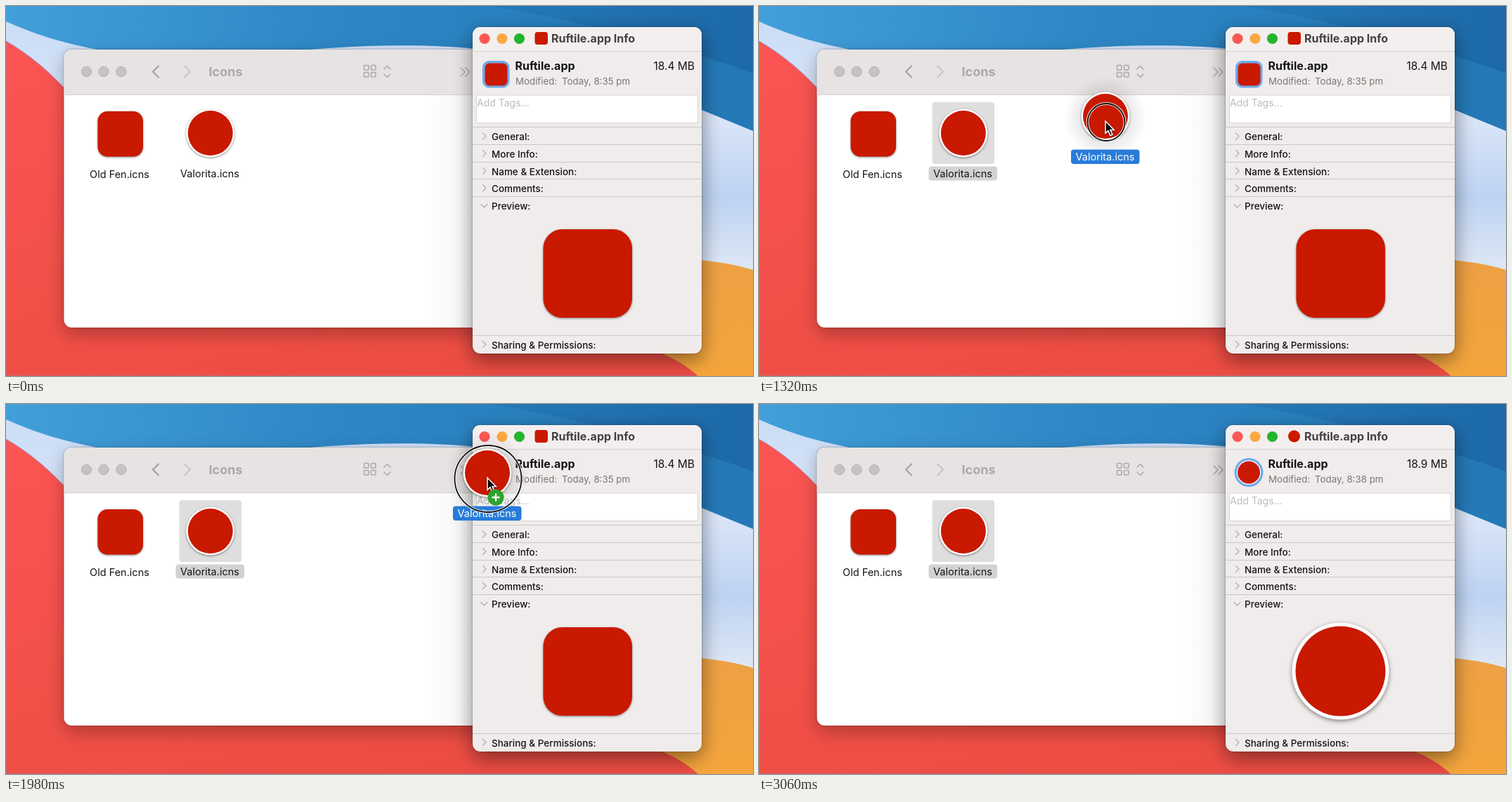
An HTML page for the animation above (4.06 s loop, 1063x527 px).

```html
<!DOCTYPE html>
<html lang="en">
<head>
<meta charset="utf-8">
<title>Changing an app icon</title>
<style>
  html, body { margin: 0; width: 100%; height: 100%; overflow: hidden; }
  svg { display: block; width: 1063px; height: 527px; }
  text { font: 14.5px Inter, Roboto, sans-serif; fill: #151414; }
  .mid { text-anchor: middle; }
  .bold { font-size: 16px; font-weight: 700; }
  .row { font-size: 13.5px; font-weight: 500; }
  .line { fill: none; stroke-width: 2; stroke-linecap: round; stroke-linejoin: round; }
  .window { filter: drop-shadow(0 9px 13px #0003) drop-shadow(0 0 1px #0006); }
  .front { filter: drop-shadow(0 9px 14px #0005) drop-shadow(0 0 1px #0006); }
  .icon { filter: drop-shadow(0 1px 1.5px #0007); }
  .red { fill: #c91900; }
</style>
</head>
<body>
<svg viewBox="0 0 1063 527">
  <defs>
    <linearGradient id="sky">
      <stop offset="0" stop-color="#429fd9"/>
      <stop offset=".45" stop-color="#2e86c4"/>
      <stop offset="1" stop-color="#2478b6"/>
    </linearGradient>
    <linearGradient id="deep">
      <stop offset="0" stop-color="#2579b7"/>
      <stop offset="1" stop-color="#1d69a8"/>
    </linearGradient>
    <linearGradient id="coral" x2=".5" y2="1">
      <stop offset="0" stop-color="#fb5553"/>
      <stop offset="1" stop-color="#ec4d43"/>
    </linearGradient>
    <linearGradient id="mist" x2="0" y2="1">
      <stop offset="0" stop-color="#cbddf6"/>
      <stop offset=".4" stop-color="#d9e5f8"/>
      <stop offset=".7" stop-color="#bdd2f2"/>
      <stop offset="1" stop-color="#dfe9f5"/>
    </linearGradient>
    <linearGradient id="amber" x2="0" y2="1">
      <stop offset="0" stop-color="#eda045"/>
      <stop offset="1" stop-color="#f4a53c"/>
    </linearGradient>
    <linearGradient id="edge">
      <stop offset="0" stop-color="#fff"/>
      <stop offset="1" stop-color="#f3f3f3"/>
    </linearGradient>
    <radialGradient id="halo">
      <stop offset=".5" stop-color="#000" stop-opacity=".11"/>
      <stop offset="1" stop-color="#000" stop-opacity="0"/>
    </radialGradient>
    <pattern id="grid" x="682" y="82" width="5" height="5" patternUnits="userSpaceOnUse">
      <rect width="5" height="5" fill="#e9edf0"/>
      <path d="M0 .5H5M.5 0V5" stroke="#cbd1d8" stroke-width=".8"/>
    </pattern>
    <g id="disc" class="icon">
      <circle r="34.5" fill="#fff"/>
      <circle r="32" class="red"/>
    </g>
  </defs>

  <!-- wallpaper -->
  <rect width="1063" height="527" fill="url(#sky)"/>
  <path d="M690 0C800 18 960 58 1063 96V0Z" fill="url(#deep)"/>
  <path d="M0 22C40 40 80 53 140 64H410C500 55 600 53 680 62C800 76 910 116 990 148L1063 178V380H0Z" fill="url(#mist)"/>
  <path d="M0 50C35 70 65 96 95 130L700 300L1063 527H0Z" fill="url(#coral)" stroke="#9b83b7" stroke-width=".8"/>
  <path d="M900 345L990 362Q1030 366 1063 376V527H985C965 510 950 501 925 492Z" fill="url(#amber)"/>

  <!-- folder window -->
  <g class="window">
    <rect x="82.5" y="62" width="760" height="396" rx="11" fill="#fff"/>
    <path d="M82.5 126V73a11 11 0 0 1 11-11H842V126Z" fill="#e7e3e3"/>
  </g>
  <rect x="600" y="126" width="66" height="332" fill="url(#edge)"/>
  <path d="M82.5 126.5H664" stroke="#d3d0d0"/>
  <g fill="#c6c2c2" stroke="#b5b1b1">
    <circle cx="114.5" cy="93.5" r="7.2"/>
    <circle cx="139" cy="93.5" r="7.2"/>
    <circle cx="164" cy="93.5" r="7.2"/>
  </g>
  <path class="line" stroke="#a19e9e" d="M217 85.5L209 93.5L217 101.5"/>
  <path class="line" stroke="#c7c3c3" d="M254 85.5L262 93.5L254 101.5"/>
  <text class="bold" x="288.5" y="100" style="font-size:18px;fill:#aba8a8">Icons</text>
  <g class="line" stroke="#aba8a8" style="stroke-width:1.5">
    <rect x="509.5" y="84.5" width="6.5" height="6.5" rx="1"/>
    <rect x="519.5" y="84.5" width="6.5" height="6.5" rx="1"/>
    <rect x="509.5" y="94.5" width="6.5" height="6.5" rx="1"/>
    <rect x="519.5" y="94.5" width="6.5" height="6.5" rx="1"/>
    <path d="M538 90L542.5 85.5L547 90M538 97L542.5 101.5L547 97M647 88L653 94L647 100M654 88L660 94L654 100"/>
  </g>
  <rect class="icon red" x="130.5" y="150" width="64.5" height="64.5" rx="14"/>
  <text class="mid" x="161.5" y="245">Old Fen.icns</text>
  <g id="selection">
    <rect x="246.5" y="137" width="88.5" height="88" rx="4" fill="#dedede"/>
    <rect x="241.5" y="228.5" width="97.5" height="20" rx="4" fill="#d2d2d2"/>
  </g>
  <use href="#disc" x="290.8" y="181"/>
  <text class="mid" x="290" y="244">Valorita.icns</text>

  <!-- info window -->
  <rect class="front" x="664" y="30" width="326" height="465" rx="11" fill="#efeceb"/>
  <path d="M664 65V41a11 11 0 0 1 11-11H979a11 11 0 0 1 11 11V65Z" fill="#f3efee"/>
  <path d="M664 64.5H990" stroke="#d5d1d0"/>
  <circle cx="681" cy="46.5" r="7.6" fill="#fc5753"/>
  <circle cx="706" cy="46.5" r="7.6" fill="#fda842"/>
  <circle cx="730.5" cy="46.5" r="7.6" fill="#24b52d"/>
  <rect id="titleSquare" class="red" x="752.5" y="37" width="18.5" height="18" rx="4"/>
  <circle id="titleDisc" class="red" cx="761.5" cy="46" r="8.5"/>
  <text class="bold" x="776" y="52" style="fill:#434141">Ruftile.app Info</text>
  <g id="wellSquare">
    <rect x="678" y="78" width="38.5" height="38.5" rx="9.5" fill="#70a9ec"/>
    <rect class="red" x="681.5" y="81.5" width="32" height="32" rx="6.5"/>
  </g>
  <g id="wellEmpty">
    <rect x="678" y="78" width="38.5" height="38.5" rx="9.5" fill="#70a9ec"/>
    <rect x="682" y="82" width="31" height="31" rx="6" fill="url(#grid)" stroke="#f8fafb"/>
  </g>
  <g id="wellDisc">
    <circle cx="697" cy="97.5" r="20.5" fill="#70a9ec"/>
    <circle cx="697" cy="97.5" r="17.2" fill="#fff"/>
    <circle class="red" cx="697" cy="97.5" r="16"/>
  </g>
  <text class="bold" x="724.5" y="91">Ruftile.app</text>
  <text id="size" x="980" y="91" text-anchor="end" style="font-size:15.5px"></text>
  <g style="fill:#797676">
    <text x="725" y="112" style="font-size:13.3px;fill:inherit">Modified:</text>
    <text id="date" x="791" y="112" style="font-size:13.3px;fill:inherit"></text>
  </g>
  <rect x="669.5" y="127" width="315" height="39.5" fill="#fff" stroke="#dad7d6"/>
  <text x="670" y="143" style="font-size:14px;fill:#bdbbbb">Add Tags...</text>
  <g id="rows"></g>
  <rect id="previewSquare" class="icon red" x="764.5" y="318" width="126.5" height="126" rx="27"/>
  <use id="previewDisc" href="#disc" transform="translate(827.5 380.5) scale(2)"/>

  <!-- dragged file and pointer -->
  <g id="drag">
    <circle cy="-5" r="59" fill="url(#halo)"/>
    <use href="#disc" y="-7"/>
    <rect x="-49" y="40.5" width="97.5" height="20.5" rx="4" fill="#287cd9"/>
    <text class="mid" x="-.5" y="56" style="fill:#fff">Valorita.icns</text>
  </g>
  <g id="ring" fill="none">
    <circle stroke="#fff" stroke-opacity=".8" stroke-width="4"/>
    <circle stroke="#111" stroke-width="1.8"/>
  </g>
  <g id="pointer">
    <path class="icon" d="M0 0V17.3L4 13.6L6.9 20.4L9.9 19.1L7 12.4H12.3Z" stroke="#fff" stroke-width="1.5"/>
    <g id="badge">
      <circle cx="12" cy="28" r="11.5" fill="#2aa42f"/>
      <path d="M6.5 28H17.5M12 22.5V33.5" stroke="#fff" stroke-width="2.4"/>
    </g>
  </g>
</svg>
<script>
const LOOP = 4060, STEP = 60;
const PRESS = 1080, OVER = 1680, RELEASE = 1860, DROP = 2040, EMPTY = 2220, UPDATED = 2400, DONE = 2880;
// time, x, y of the pointer tip
const path = [
  [480, 352, 300], [900, 291, 189], [1080, 291, 189], [1320, 493, 164], [1560, 618, 109],
  [1740, 668, 105], [1980, 685, 105], [2100, 685, 105], [2520, 703, 104]
];

const $ = id => document.getElementById(id);
const clamp = v => Math.max(0, Math.min(1, v));
const ramp = (t, from, to) => clamp((t - from) / (to - from));
const show = (id, on) => $(id).style.display = on ? '' : 'none';

const rows = [['General:', 186], ['More Info:', 210.5], ['Name & Extension:', 235.5],
  ['Comments:', 259.5], ['Preview:', 284.5], ['Sharing & Permissions:', 482.5]];
$('rows').innerHTML = rows.map(([label, y]) => {
  const arrow = label === 'Preview:' ? 'm-4.5 -2l4.5 4.5l4.5 -4.5' : 'm-2 -5l4.5 4.5l-4.5 4.5';
  return `<path d="M664 ${Math.round(y - 13) - .5}H990" stroke="#cbc7c6"/>
    <path class="line" stroke="#b5b1b0" style="stroke-width:1.4" d="M680.5 ${y}${arrow}"/>
    <text class="row" x="691" y="${y + 5}">${label.replace('&', '&amp;')}</text>`;
}).join('');

// smooth interpolation without overshoot
function along(t, axis) {
  const slope = i => path[i] && path[i + 1]
    ? (path[i + 1][axis] - path[i][axis]) / (path[i + 1][0] - path[i][0]) : 0;
  const tangent = i => {
    const a = slope(i - 1), b = slope(i);
    return a * b > 0 ? 2 * a * b / (a + b) : 0;
  };
  let i = 0;
  while (i < path.length - 2 && t >= path[i + 1][0]) i++;
  const span = path[i + 1][0] - path[i][0];
  const u = clamp((t - path[i][0]) / span), v = 1 - u;
  return path[i][axis] * v * v * (1 + 2 * u) + path[i + 1][axis] * u * u * (1 + 2 * v)
    + span * u * v * (tangent(i) * v - tangent(i + 1) * u);
}

function draw(now) {
  const t = Math.floor(now % LOOP / STEP) * STEP;
  const x = along(t, 1), y = along(t, 2);
  const move = (id, dx = 0, dy = 0) => $(id).setAttribute('transform', `translate(${x + dx} ${y + dy})`);
  move('pointer');
  move('drag');
  move('ring', 1, 1.5);
  $('pointer').style.opacity = ramp(t, 480, 660) * (1 - ramp(t, 2700, 2880));
  show('selection', t >= PRESS);
  show('drag', t > PRESS && t < DROP);
  show('badge', t >= OVER && t < DROP);

  const radius = 14 + 12.5 * ramp(t, PRESS, 1200) + 21 * ramp(t, RELEASE, 1980);
  for (const circle of $('ring').children) circle.setAttribute('r', radius);
  $('ring').style.opacity = 1 - ramp(t, 1980, 2100);
  show('ring', t > PRESS && t < 2100);

  const updated = t >= UPDATED, done = t >= DONE;
  show('titleSquare', !updated);
  show('titleDisc', updated);
  show('wellSquare', t < EMPTY);
  show('wellEmpty', t >= EMPTY && !done);
  show('wellDisc', done);
  show('previewSquare', !done);
  show('previewDisc', done);
  $('size').textContent = updated ? '18.9 MB' : '18.4 MB';
  $('date').textContent = updated ? 'Today, 8:38 pm' : 'Today, 8:35 pm';
  requestAnimationFrame(() => draw(performance.now()));
}
draw(performance.now());
</script>
</body>
</html>
```
